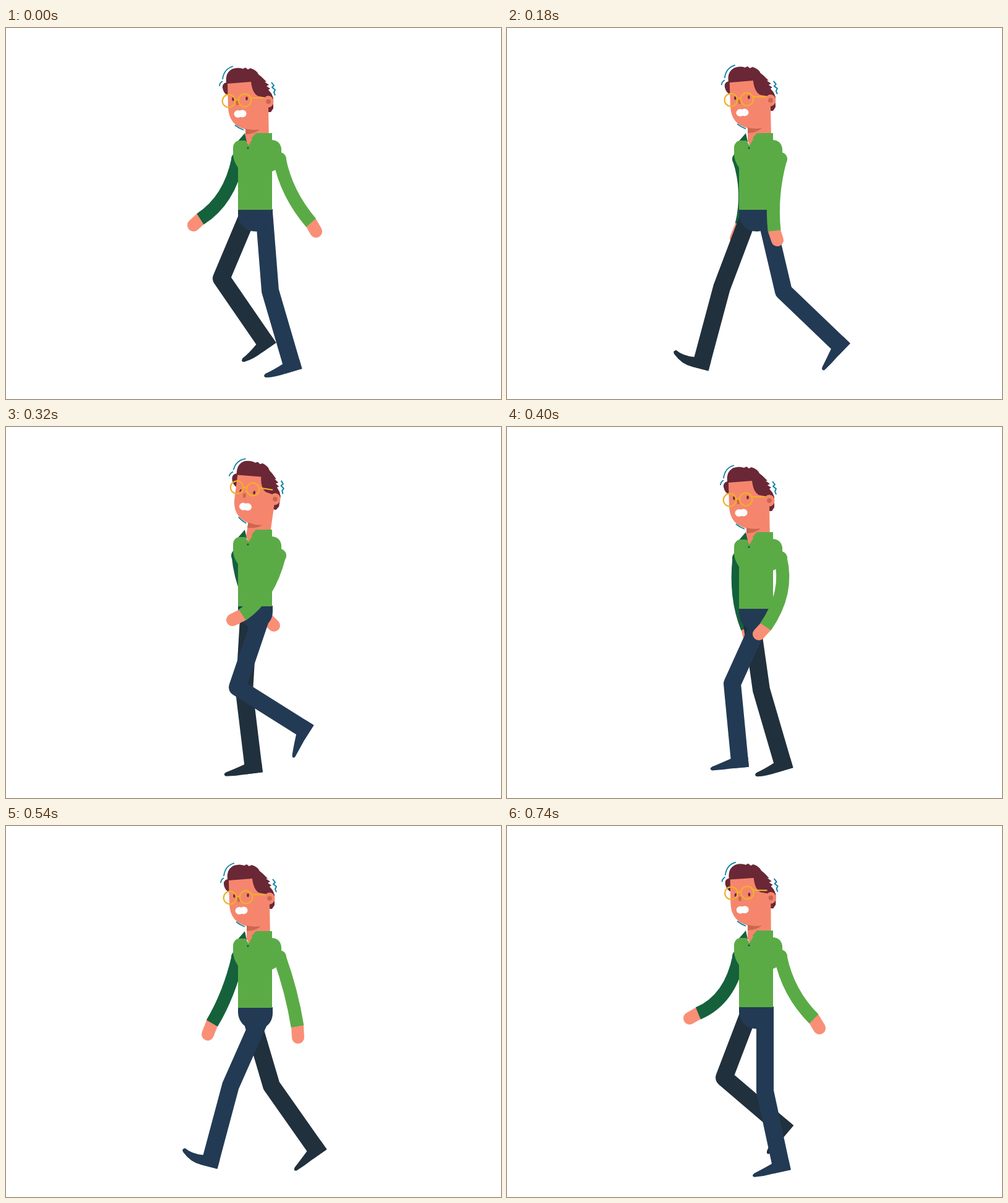
These frames come from a looping animation (800 px wide and 600 px high, 0.76 s). An HTML page with a canvas:

```html
<!DOCTYPE html>
<html lang="en">
<head>
<meta charset="utf-8">
<title>Walk cycle</title>
<style>
html, body { margin: 0; width: 100%; height: 100%; overflow: hidden; background: #fff; }
canvas { display: block; }
</style>
</head>
<body>
<canvas id="stage" width="800" height="600"></canvas>
<script>
const ctx = document.getElementById('stage').getContext('2d');
const LOOP = 760, STEP = 20;

const C = {
  green: '#5aab46', darkGreen: '#15613c', navy: '#233a54', darkNavy: '#20303d',
  skin: '#f5866d', hand: '#f98f76', shade: '#cb6650', hair: '#6a2736',
  gold: '#f0b02c', blue: '#0d82a6'
};

// time, knee x y, sole centre x y, toe curl
const LEG = [
  [0, 427, 425, 465, 555, 3],
  [140, 445, 420, 523, 531, 0],
  [180, 447, 426, 545, 520, 0],
  [220, 417, 420, 552, 437, -8],
  [320, 374, 421, 490, 494, -2],
  [340, 367, 407, 470, 495, 0],
  [360, 364, 405, 441, 517, 4],
  [400, 364, 415, 377, 551, 0],
  [490, 355, 413, 313, 542, 8],
  [540, 363, 420, 328, 551, 13],
  [620, 372, 425, 372, 563, 0],
  [680, 401, 428, 417, 560, 1],
  [740, 417, 429, 445, 559, 1]
];

// time, elbow control x y, wrist x y, fingertips x y
const NEAR_ARM = [
  [0, 453, 268, 493, 315, 501, 329],
  [180, 426, 270, 432, 328, 437, 343],
  [320, 425, 275, 382, 304, 366, 312],
  [400, 456, 268, 418, 323, 407, 335],
  [540, 462, 268, 471, 324, 472, 342],
  [620, 453, 270, 492, 316, 500, 331],
  [740, 454, 270, 496, 312, 505, 327]
];
const FAR_ARM = [
  [0, 361, 279, 314, 309, 303, 319],
  [180, 392, 265, 379, 318, 370, 340],
  [320, 382, 275, 418, 306, 433, 321],
  [400, 368, 275, 388, 325, 391, 337],
  [540, 361, 272, 333, 319, 326, 337],
  [620, 362, 279, 316, 310, 306, 323],
  [740, 361, 281, 309, 303, 295, 311]
];

// time, head x y, head tilt, glasses lift, body lift; twice per loop
const BOB = [
  [0, 0, 0, 0, 0, 0],
  [20, 0, 0, 0, 0, 0],
  [160, 2, -2, 0, 0, 0],
  [240, 2, -2, 0, 0, 0],
  [320, 4, -6, 9, -8, -4],
  [360, 2, -3, 0.5, -6, -1]
];

// Periodic cubic through the rows of a track
function sample(track, time, period) {
  const n = track.length, t = time % period;
  const row = k => {
    const wrap = Math.floor(k / n), r = track[k - wrap * n];
    return [r[0] + wrap * period, ...r.slice(1)];
  };
  let i = n - 1;
  while (track[i][0] > t) i--;
  const [a, b, c, d] = [row(i - 1), row(i), row(i + 1), row(i + 2)];
  const h = c[0] - b[0], s = (t - b[0]) / h, s2 = s * s, s3 = s2 * s;
  return b.slice(1).map((p, j) => {
    const k = j + 1, q = c[k];
    const m = (q - a[k]) / (c[0] - a[0]) * h;
    const w = (d[k] - p) / (d[0] - b[0]) * h;
    return p * (2 * s3 - 3 * s2 + 1) + m * (s3 - 2 * s2 + s)
      + q * (3 * s2 - 2 * s3) + w * (s3 - s2);
  });
}

function fill(path, color) {
  ctx.fillStyle = color;
  ctx.fill(new Path2D(path));
}

function line(path, color, width, cap = 'butt') {
  ctx.strokeStyle = color;
  ctx.lineWidth = width;
  ctx.lineCap = cap;
  ctx.lineJoin = 'round';
  ctx.stroke(new Path2D(path));
}

function oval(x, y, rx, ry, color) {
  ctx.fillStyle = color;
  ctx.beginPath();
  ctx.ellipse(x, y, rx, ry, 0, 0, 7);
  ctx.fill();
}

function ring(x, y, r) {
  ctx.strokeStyle = C.gold;
  ctx.lineWidth = 2.2;
  ctx.beginPath();
  ctx.arc(x, y, r, 0, 7);
  ctx.stroke();
}

function leg(time, hipX, hipY, shift, color) {
  let [kx, ky, bx, by, curl] = sample(LEG, time, LOOP);
  kx += shift;
  bx += shift;
  line(`M${hipX} ${hipY}L${kx} ${ky}L${bx} ${by}`, color, 28);
  const len = Math.hypot(bx - kx, by - ky);
  const vx = (bx - kx) / len, vy = (by - ky) / len;
  ctx.save();
  ctx.transform(-vy, vx, vx, vy, bx, by);
  fill(`M-14 0V-16H14Q32 ${-10 - curl * 0.2} 45 ${-6 - curl}
    Q51 ${-3 - curl} 46 ${-curl * 0.9}Q30 1 14 0Z`, color);
  ctx.restore();
}

function arm(track, time, sx, sy, color) {
  const [ex, ey, wx, wy, hx, hy] = sample(track, time, LOOP);
  line(`M${wx} ${wy}L${hx} ${hy}`, C.hand, 20, 'round');
  // Trim the round palm so the cuff stays straight
  oval(sx, sy, 11, 11, color);
  line(`M${sx} ${sy}Q${ex} ${ey} ${wx} ${wy}`, color, 21);
}

function head(dx, dy, tilt, lift) {
  ctx.save();
  ctx.translate(405 + dx, 165 + dy);
  ctx.rotate(tilt * Math.PI / 180);
  ctx.translate(-405, -165);

  line('M367 62Q352 66 350 83M350 86Q345 89 345 94', C.blue, 1.8);
  line('M429 88L433 93L430 96L435 100L433 104L435 109', C.blue, 2);
  line('M370 157Q376 162 384 165', C.blue, 1.8);

  fill(`M360 110Q352 107 350 97Q349 90 356 88Q354 72 366 66Q376 63 383 66
    L387 64L391 67L395 65Q405 68 408 75L413 79L421 87L418 87L425 92L421 94
    L427 98L424 100L429 106L432 113V130L428 136H420Z`, C.hair);
  fill(`M358 90L396 87Q398 105 407 110L418 112L424 126L425 185L392 195L387 185
    V164Q360 157 359 128Z`, C.skin);
  fill('M387 163Q398 166 410 164Q402 171 387 172Z', C.shade);
  oval(424, 119, 8.5, 9.5, C.skin);
  oval(424, 119, 3.8, 3.8, C.shade);
  oval(374, 121, 2.4, 4, C.shade);
  oval(367, 115, 1.8, 3, C.hair);
  oval(389, 114, 1.8, 3, C.hair);
  oval(375, 139, 6.5, 6, '#fff');
  oval(382, 138.5, 6.5, 6, '#fff');

  ctx.translate(0, lift);
  ring(360, 118, 10.3);
  ring(386, 117, 10.3);
  line('M370 117Q373 115 376 117M396 113L418 113', C.gold, 2.2);
  ctx.restore();
}

function torso() {
  fill('M373 185L386 170L389 184Z', C.darkGreen);
  fill(`M377 182H387L392 190L398 180L397 178L404 170H430V181Q443 182 445 195V212
    Q442 228 430 232V294H375V226Q367 214 367 204V193Q368 183 377 182Z`, C.green);
  oval(391, 194, 1.6, 1.8, C.darkGreen);
}

function draw(t) {
  const [dx, dy, tilt, lift, body] = sample(BOB, t, LOOP / 2);
  ctx.fillStyle = '#fff';
  ctx.fillRect(0, 0, 800, 600);

  arm(FAR_ARM, t, 375, 212 + body, C.darkGreen);
  leg(t + 360, 393, 298 + body, -16, C.darkNavy);
  leg(t, 417, 298 + body, 0, C.navy);

  ctx.save();
  ctx.translate(0, body);
  fill(`M375 293H431V302C431 320 418 329 403 329
    C388 329 376 318 375 302Z`, C.navy);
  ctx.restore();

  head(dx, dy, tilt, lift);
  ctx.save();
  ctx.translate(0, body);
  torso();
  ctx.restore();
  arm(NEAR_ARM, t, 442, 212 + body, C.green);
}

function tick() {
  draw(Math.floor(performance.now() % LOOP / STEP) * STEP);
  requestAnimationFrame(tick);
}
tick();
</script>
</body>
</html>
```
